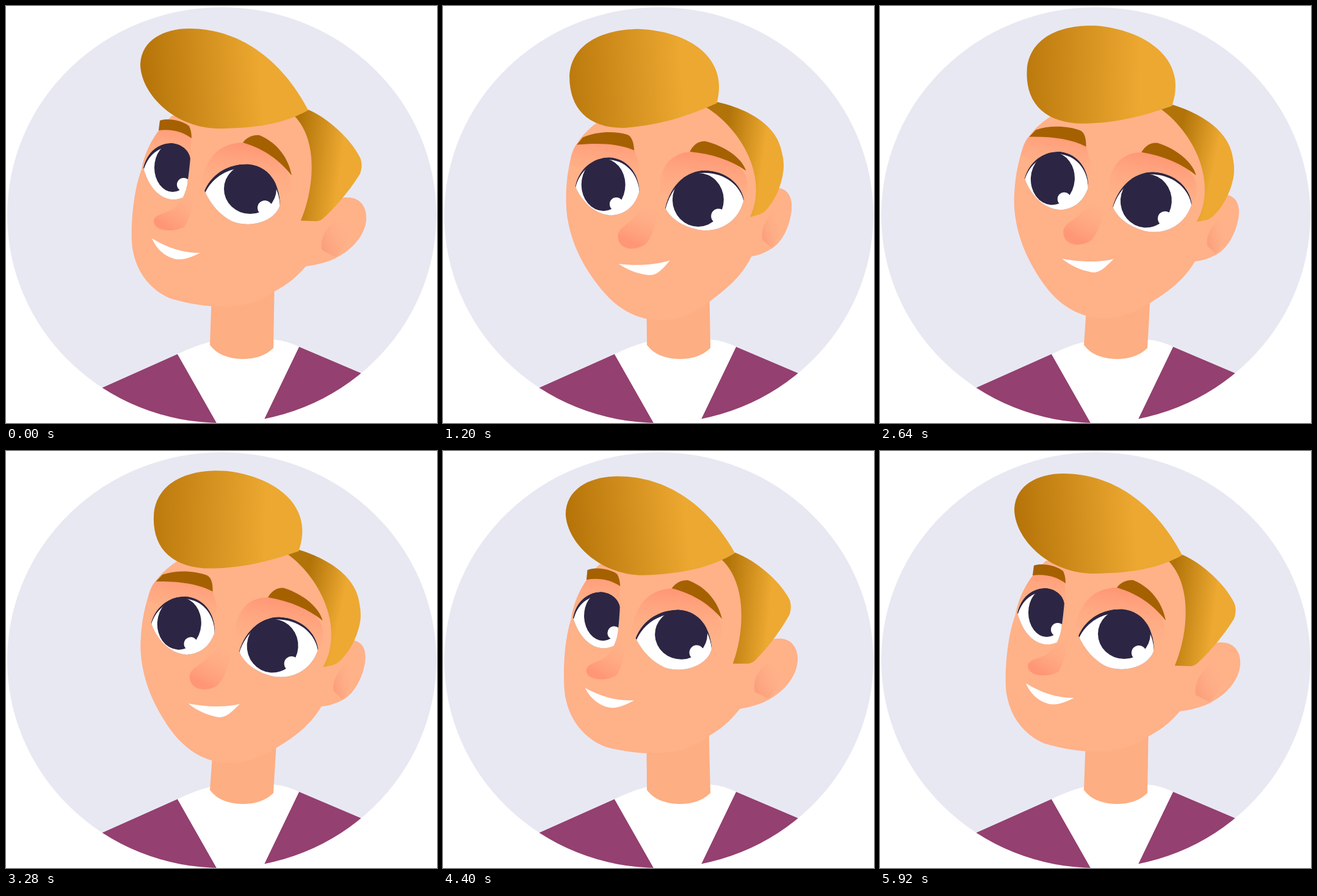
Animation, 706 px wide and 684 px high, one loop 6000 ms. Source, as an HTML page with a canvas:

```html
<!DOCTYPE html>
<html lang="en">
<head>
<meta charset="utf-8">
<title>Portrait</title>
<style>
html, body { margin: 0; width: 100%; height: 100%; overflow: hidden; background: #fff; }
canvas { display: block; }
</style>
</head>
<body>
<canvas id="stage" width="706" height="684"></canvas>
<script>
const ctx = document.getElementById('stage').getContext('2d');
const LOOP = 6000, STEP = 80, PIVOT = [405, 558];
const SKIN = '#ffb188', SKIN_CLEAR = 'rgba(255,177,136,0)', DARK = '#2c2644';

// Keyed values as [time, value], eased between neighbours
const TURN = [[0, 0], [800, 1], [3540, 1], [4480, 0], [6000, 0]];
const TILT = [[0, 0], [640, -1], [1760, 0], [2640, 3.8], [3440, 4], [4640, -3.1], [5120, -3.1], [5920, 0], [6000, 0]];
const GAZE = [[0, 0], [800, 0], [1120, 1], [3440, 1], [3720, 0], [6000, 0]];
const BLINK = [[0, 0], [3440, 0], [3680, 1], [4080, 0], [6000, 0]];

function at(keys, t) {
  const i = keys.findIndex(key => key[0] > t);
  const [t0, v0] = keys[i - 1], [t1, v1] = keys[i];
  const u = (t - t0) / (t1 - t0);
  return v0 + (v1 - v0) * u * u * (3 - 2 * u);
}

let turn = 0;
const lerp = (a, b) => a + (b - a) * turn;

// Blend two paths of the same structure: three-quarter view and front view
function mix(a, b) {
  const ends = b.match(/[\d.]+/g);
  let i = 0;
  return a.replace(/[\d.]+/g, n => lerp(+n, +ends[i++]).toFixed(2));
}

function fill(color, path) {
  ctx.fillStyle = color;
  ctx.fill(new Path2D(path));
}

function oval(color, x, y, rx, ry = rx) {
  ctx.fillStyle = color;
  ctx.beginPath();
  ctx.ellipse(x, y, rx, ry, 0, 0, 7);
  ctx.fill();
}

function fade(a, b, from, to) {
  const g = ctx.createLinearGradient(...mix(a, b).split(' ').map(Number));
  g.addColorStop(0, from);
  g.addColorStop(1, to);
  return g;
}

function eye(outline, pupil, glint, axis, gaze, blink) {
  const [px, py, rx, ry] = pupil, [gx, gy, gr] = glint, [ax, ay, slope] = axis;
  const shape = new Path2D(outline);
  const base = ctx.getTransform();
  const cx = px - gaze * 16, cy = py + gaze * 4;
  ctx.save();
  // Lids squeeze the outline towards a slanted axis
  ctx.transform(1, blink * slope, 0, 1 - blink, 0, blink * (ay - slope * ax));
  ctx.clip(shape);
  ctx.fillStyle = DARK;
  ctx.fill(shape);
  ctx.translate(0, 6 - 2 * turn);
  ctx.fillStyle = '#fff';
  ctx.fill(shape);
  ctx.setTransform(base);
  oval(DARK, cx, cy, rx, ry);
  oval('#fff', cx + gx, cy + gy, gr);
  ctx.restore();
}

function body(tilt) {
  fill('#944070', 'M158 626 L281 571 L348.5 690 L150 690Z M480 559 L581 602 L640 690 L417 690Z');
  fill('#fff', 'M281 571 Q310 557 334 551 L438 547 Q460 549 480 559 L417 690 L348.5 690Z');
  const lean = tilt * Math.PI / 180;
  const left = lerp(337, 334) + lean * 88, right = lerp(440, 437) + lean * 118;
  fill('#fdae82', `M${left} 470 L334 556 Q350 578 387 579 Q420 579 438 561 L${right} 440Z`);
}

function head(gaze, blink) {
  fill(SKIN, mix(
    'M545 316 C575 308 592 325 590 352 C586 385 555 408 530 418 Q510 425 490 427 L500 350Z',
    'M540 300 C565 296 575 312 573 336 C569 368 555 390 540 399 Q522 410 505 412 L505 340Z'));
  fill(fade('515 385 560 365', '523 370 556 360', '#fb9f7c', SKIN_CLEAR), mix(
    'M517 400 C514 372 532 350 568 341 Q570 380 540 412Z',
    'M525 385 C520 365 535 345 553 325 Q560 370 540 398Z'));
  fill(SKIN, mix(
    'M272 180 C245 205 228 235 222 268 C206 310 203 380 208 402 C216 445 245 470 270 480 C340 500 400 498 440 468 C465 455 480 440 492 426 L530 330 C510 250 500 200 470 175Z',
    'M270 180 C246 195 222 215 213 245 C203 280 202 320 206 348 C214 400 242 442 264 468 C312 525 380 530 440 483 C465 465 490 445 507 411 L525 340 C520 260 500 200 440 165Z'));

  // Eyelid shading
  fill(fade('385 225 375 315', '430 240 420 335', '#ff9674', SKIN_CLEAR), mix(
    'M318 305 C322 255 345 224 390 224 C430 224 466 255 467 300 C460 320 450 325 440 330Z',
    'M358 305 C355 260 380 240 410 239 C450 234 500 262 501 290 C502 320 490 330 470 340Z'));
  fill(fade('270 200 262 270', '270 222 262 295', '#ff9c79', SKIN_CLEAR), mix(
    'M224 262 C232 232 242 215 252 203 C270 201 290 206 303 215 L303 270 L240 285Z',
    'M210 258 C212 242 216 232 222 225 C255 222 290 224 316 235 Q325 262 322 290 L230 300Z'));

  eye(mix(
    'M225 265 C232 235 255 224 272 225 C290 227 300 238 302 250 C299 280 297 300 290 314 C262 326 235 305 225 265Z',
    'M219 294 C225 264 250 247 275 247 C305 249 323 274 324 302 C319 322 306 339 281 342 C251 343 228 317 219 294Z'),
    [lerp(273, 281), lerp(265, 288), lerp(30, 36), lerp(40, 43)],
    [lerp(18, 21), lerp(28, 32), 11],
    [lerp(263, 272), lerp(276, 296), 0.25], gaze, blink);
  eye(mix(
    'M325 303 C340 268 375 257 400 260 C430 264 448 290 449 325 C443 352 402 366 370 353 C350 343 335 325 325 303Z',
    'M366 331 C375 290 405 270 430 270 C465 270 490 292 495 318 C487 352 458 371 425 368 C398 364 375 350 366 331Z'),
    [lerp(400, 436), lerp(300, 314), lerp(43, 42), lerp(41, 44)],
    [lerp(24, 33), lerp(31, 27), 12],
    [lerp(388, 432), lerp(313, 325), 0.14], gaze, blink);

  // Nose and mouth
  fill(fade('262 360 300 300', '308 385 338 318', '#ff9776', SKIN_CLEAR), mix(
    'M242 354 C242 340 262 342 278 330 C290 316 297 300 305 290 C310 310 304 345 292 362 C275 372 244 370 242 354Z',
    'M288 376 C290 362 305 358 318 342 C330 330 340 318 350 312 C356 340 348 370 336 387 C322 402 288 402 288 376Z'));
  fill('#fff', mix(
    'M239 381 C265 397 290 405 318 405 C300 414 288 417 277 415 C260 411 246 398 239 381Z',
    'M289 422 C320 426 350 424 373 417 C360 432 352 441 340 441 C320 439 303 432 289 422Z'));

  // Brows
  fill('#a56100', mix(
    'M250 204 L252 188 C265 183 290 188 300 197 Q304 205 304 217 C290 206 270 201 250 204Z',
    'M222 226 L232 214 C255 204 285 204 305 210 Q315 214 316 236 C290 224 255 223 222 226Z'));
  fill('#a56100', mix(
    'M388 224 C395 215 405 211 415 212 C440 222 462 245 468 278 C450 255 425 235 388 224Z',
    'M407 239 C413 228 420 222 432 222 C465 230 492 250 499 271 C475 254 445 243 407 239Z'));

  // Hair: side, then quiff
  fill(fade('475 240 550 250', '465 225 530 235', '#b27409', '#eda931'), mix(
    'M472 180 L495 170 C530 185 565 220 578 245 Q586 258 580 275 C565 300 540 330 520 348 Q514 353 508 353 L483 352 C505 300 512 220 472 180Z',
    'M434 166 L453 158 C495 168 550 192 558 242 Q562 258 560 272 C556 300 545 320 532 335 Q526 341 520 343 L505 347 C535 285 495 205 434 166Z'));
  fill(fade('215 110 415 95', '175 115 395 105', '#b37107', '#eca830'), mix(
    'M495 171 C455 193 410 201 345 201 C270 198 220 140 220 95 C222 55 260 37 300 37 C380 37 450 85 495 171Z',
    'M452 160 C418 174 370 195 300 199 C240 199 211 166 211 115 C213 61 265 37 325 37 C408 41 473 86 452 160Z'));
}

function draw(now) {
  const t = Math.floor(now % LOOP / STEP) * STEP;
  const tilt = at(TILT, t);
  turn = at(TURN, t);
  ctx.fillStyle = '#fff';
  ctx.fillRect(0, 0, 706, 684);
  oval('#e8e8f3', 353.5, 343, 351.5, 341);
  ctx.save();
  ctx.beginPath();
  ctx.ellipse(353.5, 343, 351.5, 341, 0, 0, 7);
  ctx.clip();
  body(tilt);
  ctx.translate(...PIVOT);
  ctx.rotate(tilt * Math.PI / 180);
  ctx.translate(-PIVOT[0], -PIVOT[1]);
  head(at(GAZE, t), at(BLINK, t));
  ctx.restore();
}

const start = performance.now();
function tick() {
  draw(performance.now() - start);
  requestAnimationFrame(tick);
}
tick();
</script>
</body>
</html>
```
